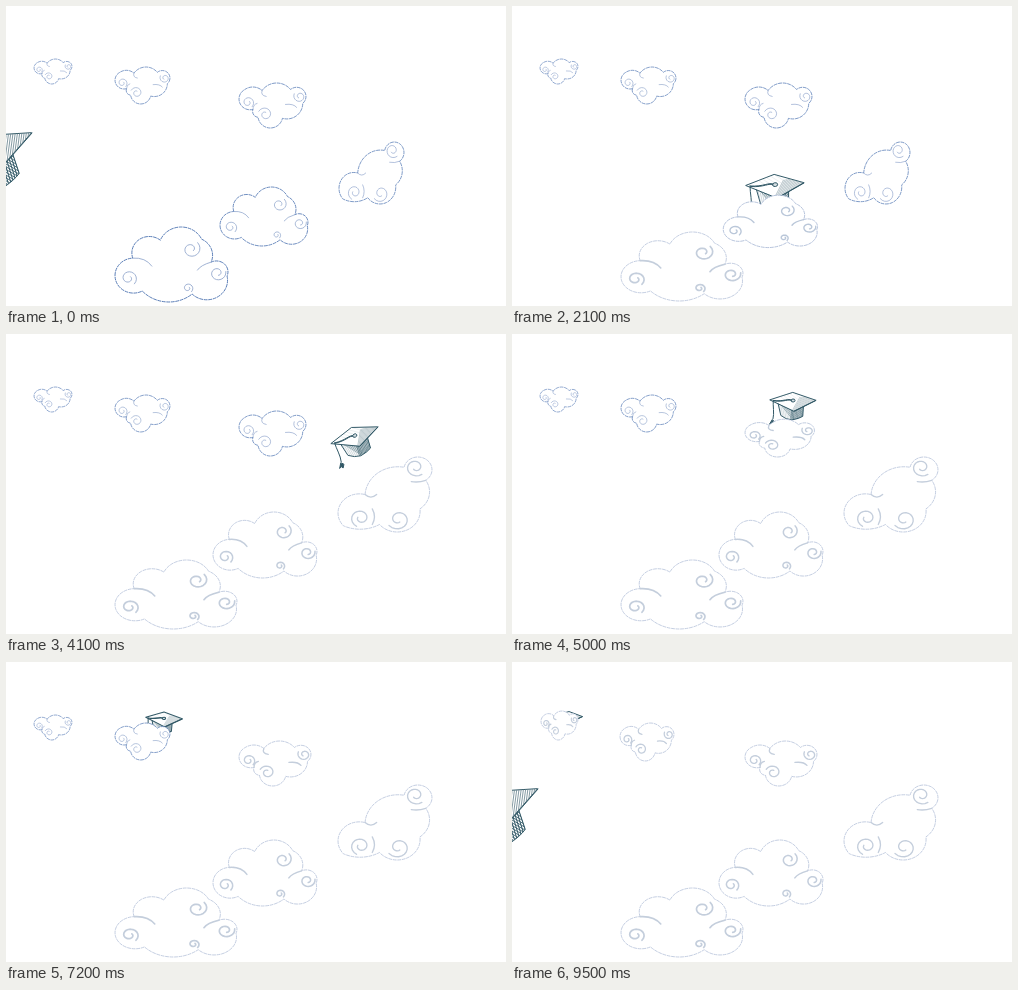
An HTML page for the animation above (9.6 s loop, 500 by 300 pixels).

```html
<!DOCTYPE html>
<html lang="en">
<head>
<meta charset="utf-8">
<title>Graduation cap among clouds</title>
<style>
html, body { margin: 0; width: 100%; height: 100%; overflow: hidden; background: #fff; }
svg { display: block; width: 500px; height: 300px; }
path { vector-effect: non-scaling-stroke; }
.hatch { vector-effect: none; }
</style>
</head>
<body>
<svg id="stage" viewBox="0 0 500 300" fill="none" stroke-linecap="round" stroke-linejoin="round"></svg>
<script>
const LOOP = 9600, STEP = 100;
const stage = document.getElementById('stage');

// Lobes: corner and bulge of the arc that leaves it. Curls: centre, radius, start angle, direction
const shapes = {
  wide: {
    lobes: [[127, 252, .75], [153, 234, .65], [192, 233, .4], [201, 256, .7], [216, 270, .75], [183, 288, .4], [136, 285, 1.25]],
    curls: [[182, 243, 9, -.8, 1], [207, 267, 8, -.2, 1], [123, 272, 8, .8, -1], [179, 282, 5, .8, -1]],
    ticks: 'M127 252Q139 251 145 260M188 264Q191 259 201 256'
  },
  tilted: {
    lobes: [[352, 168, .45], [379, 147, 1.5], [394, 157, .4], [390, 179, .75], [362, 191, .25], [337, 192, .75]],
    curls: [[387, 147, 7, .9, 1], [349, 186, 7, 2, 1], [375, 187, 8, 2.5, -1]],
    ticks: 'M352 168Q356 172 360 168M357 179Q360 185 357 191M384 158Q389 159 394 157'
  },
  small: {
    lobes: [[248, 104, .9], [240, 84, .35], [257, 85, .5], [285, 84, 1], [297, 98, .5], [277, 113, .85], [253, 112, .5]],
    curls: [[243, 97, 6, .8, -1], [260, 109, 7, 3.6, 1], [294, 91, 6, 3.6, -1]],
    ticks: 'M257 85Q255 90 261 91M252 98Q248 99 248 104M280 99Q288 98 291 102'
  }
};

// Resting box and grown box as [left, top, width, height]; hit is when the cap lands
const clouds = [
  { shape: 'wide', rest: [109, 221, 113, 75], grown: [109, 226, 122, 69], hit: 1300 },
  { shape: 'wide', rest: [214, 181, 88, 59], grown: [207, 178, 104, 66], hit: 2200 },
  { shape: 'tilted', rest: [333, 136, 65, 62], grown: [332, 123, 94, 75], hit: 3500 },
  { shape: 'small', rest: [233, 77, 67, 45], grown: [233, 79, 72, 45], hit: 5050 },
  { shape: 'small', rest: [109, 61, 55, 37], grown: [108, 61, 54, 38], hit: 7900 },
  { shape: 'small', rest: [28, 53, 38, 25], grown: [29, 49, 37, 29], hit: 9200 }
];

// Flight of the cap: time, x, y
const track = [
  [0, -18, 144], [800, 113, 195], [1250, 155, 214], [2100, 263, 178], [2450, 272, 190],
  [3400, 349, 141], [3700, 364, 143], [4000, 355, 110], [4600, 310, 64], [5000, 281, 66],
  [5500, 270, 77], [6500, 209, 48], [7200, 158, 56], [7900, 135, 64], [8900, 92, 43], [9500, 57, 54]
];

const mix = (a, b, u) => a + (b - a) * u;
const ease = (t, a, b) => {
  const u = Math.min(1, Math.max(0, (t - a) / (b - a)));
  return u * u * (3 - 2 * u);
};
const tint = (from, to, u) => `rgb(${from.map((c, i) => Math.round(mix(c, to[i], u)))})`;

function add(parent, tag, attrs = {}) {
  const el = document.createElementNS('http://www.w3.org/2000/svg', tag);
  for (const k in attrs) el.setAttribute(k, attrs[k]);
  parent.appendChild(el);
  return el;
}

function lobePath(lobes) {
  let d = `M${lobes[0][0]} ${lobes[0][1]}`;
  lobes.forEach(([x, y, bulge], i) => {
    const [nx, ny] = lobes[(i + 1) % lobes.length];
    const r = Math.hypot(nx - x, ny - y) * (1 + bulge * bulge) / (4 * bulge);
    d += `A${r} ${r} 0 ${bulge > 1 ? 1 : 0} 1 ${nx} ${ny}`;
  });
  return d + 'Z';
}

function curlPath([x, y, r, start, dir]) {
  let d = '';
  for (let i = 0; i <= 24; i++) {
    const k = r * (1 - i / 34), a = start + dir * i * .32;
    d += `${i ? 'L' : 'M'}${x + k * Math.cos(a)} ${y + k * Math.sin(a)}`;
  }
  return d;
}

function hatchPath(x0, x1, gap, y0, y1, slant) {
  let d = '';
  for (let x = x0; x <= x1; x += gap) d += `M${x} ${y0}l${slant} ${y1 - y0}`;
  return d;
}

function buildCap() {
  const ink = '#315866';
  const board = 'M-45-5L1-15L45 5L0 22Z';
  const band = 'M-30 4L-27 28Q-18 37-6 39Q8 38 16 34L20 10Z';
  const defs = add(stage, 'defs');
  const g = add(defs, 'g', { id: 'cap', stroke: ink });
  const line = (d, fill = 'none') => add(g, 'path', { d, fill });
  const hatch = (clip, width, stroke, ...rule) => add(g, 'path', {
    d: hatchPath(...rule), class: 'hatch', 'clip-path': `url(#${clip})`, 'stroke-width': width, stroke
  });
  add(add(defs, 'clipPath', { id: 'band' }), 'path', { d: band });
  add(add(defs, 'clipPath', { id: 'board' }), 'path', { d: board });

  line(band, '#fff');
  hatch('band', .6, '#829ba5', -28, -4, 3, 5, 42, 2);
  hatch('band', .9, ink, -2, 34, 2.6, 5, 42, -7);
  hatch('band', .7, ink, -26, 20, 2.8, 5, 42, 24);
  line(board, '#fff');
  hatch('board', .7, '#68848e', 14, 62, 2.6, -4, 24, -20);
  hatch('board', .4, '#b5c4ca', -30, 8, 8, -14, 0, 16);
  line('M0 22.5L45 5.5');
  line('M-2 0C-10-5-17 2-39-3M-2 1C-10-4-17 3-38-2');
  line('M-4 1a4 3 0 1 0 8 0a4 3 0 1 0-8 0', '#d4dee2');
  line('M-39-3C-41 8-39 22-43 33');
  line('M-45 35L-51 43L-47 41L-45 45L-41 40Z', ink);
}

buildCap();
const cap = add(stage, 'use', { href: '#cap' });
const nextCap = add(stage, 'use', { href: '#cap' });

for (const c of clouds) {
  const { lobes, curls, ticks } = shapes[c.shape];
  c.node = add(stage, 'g');
  c.outline = add(c.node, 'path', { d: lobePath(lobes), fill: '#fff', 'stroke-dasharray': '3 1.5' });
  c.detail = add(c.node, 'path', { d: curls.map(curlPath).join('') + ticks });
  c.base = c.outline.getBBox();
  c.weight = .5 + c.rest[2] / 230;
}

// Smooth curve through the track
function position(t) {
  const n = track.length - 1;
  let i = 0;
  while (i < n - 1 && t > track[i + 1][0]) i++;
  const a = track[i], b = track[i + 1], p = track[Math.max(0, i - 1)], q = track[Math.min(n, i + 2)];
  const h = b[0] - a[0], u = (t - a[0]) / h, u2 = u * u, u3 = u2 * u;
  return [1, 2].map(k => {
    const m0 = (b[k] - p[k]) / (b[0] - p[0]) * h;
    const m1 = (q[k] - a[k]) / (q[0] - a[0]) * h;
    return mix(a[k], b[k], 3 * u2 - 2 * u3) + (u3 - 2 * u2 + u) * m0 + (u3 - u2) * m1;
  });
}

function placeCap(el, t) {
  const [x, y] = position(t), away = ease(t, 800, 2100);
  const scale = .738 - t * .0000465 + .3 * (1 - away);
  const tilt = 40 * Math.exp(-(((t - 3400) / 900) ** 2));
  const angle = -28 * (1 - ease(t, 0, 800)) - 4 * away - tilt;
  el.setAttribute('transform', `translate(${x} ${y}) rotate(${angle}) scale(${scale})`);
}

// A cloud is pressed down by the cap, then swells and pales
function placeCloud(c, t) {
  const pale = ease(t, c.hit - 400, c.hit), grow = ease(t, c.hit - 400, c.hit + 300);
  let [x, y, w, h] = c.rest.map((v, i) => mix(v, c.grown[i], grow));
  const squash = .16 * h * Math.sin(Math.PI * grow);
  y += squash;
  h -= squash;
  const { base } = c, sx = w / base.width, sy = h / base.height;
  c.node.setAttribute('transform', `matrix(${sx} 0 0 ${sy} ${x - base.x * sx} ${y - base.y * sy})`);
  c.outline.setAttribute('stroke', tint([92, 127, 184], [190, 201, 222], pale));
  c.outline.setAttribute('stroke-width', mix(c.weight, .9, pale));
  c.detail.setAttribute('stroke', tint([135, 158, 200], [196, 206, 220], pale));
  c.detail.setAttribute('stroke-width', c.weight * mix(.8, 1.7, pale));
}

function render(t) {
  placeCap(cap, t);
  placeCap(nextCap, 0);
  nextCap.style.display = t >= LOOP - STEP ? '' : 'none';
  for (const c of clouds) placeCloud(c, t);
}

const begin = performance.now();
function tick() {
  const t = (performance.now() - begin) % LOOP;
  render(Math.floor(t / STEP) * STEP);
  requestAnimationFrame(tick);
}
tick();
</script>
</body>
</html>
```
